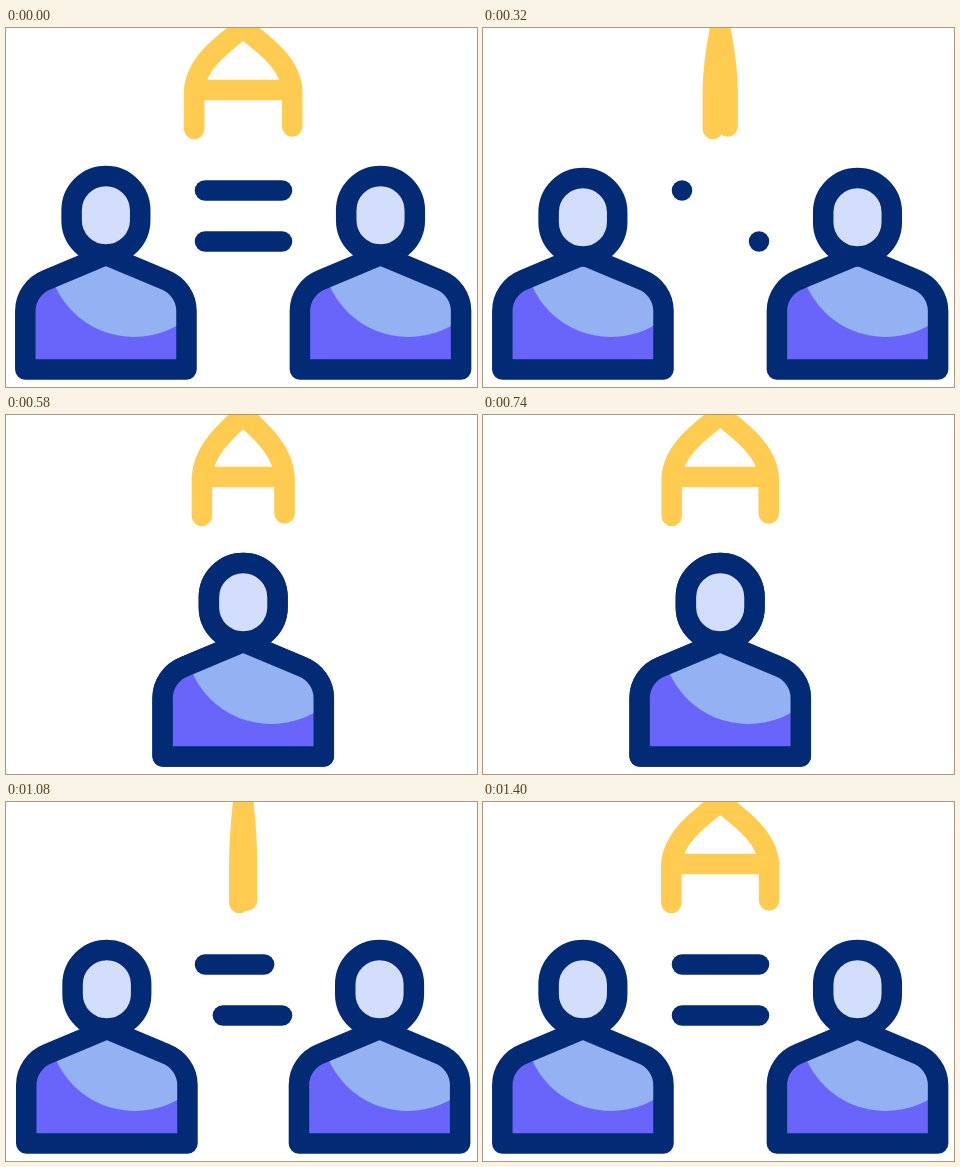
An HTML page with a canvas that plays this animation: 471x359 px, repeating every 1.44 s.

```html
<!DOCTYPE html>
<html lang="en">
<head>
<meta charset="utf-8">
<title>Two people, one letter</title>
<style>
  html, body { margin: 0; height: 100%; overflow: hidden; background: #fff; }
  canvas { display: block; }
</style>
</head>
<body>
<canvas width="471" height="359"></canvas>
<script>
const ctx = document.querySelector('canvas').getContext('2d');
const LOOP = 1440, STEP = 20, SPIN = 1416;
const NAVY = '#032a75', GOLD = '#ffcb50', VIOLET = '#6a65fa', SKY = '#93b1f3', PALE = '#d3ddfc';
const CENTER = 237.2, SPREAD = 137.3;

const body = new Path2D('M0 227L-59 251.8C-72 257-80.6 269-80.6 283V341.5H80.6V283C80.6 269 72 257 59 251.8Z');
const head = new Path2D();
head.roundRect(-34.3, 148, 68.6, 78.5, 34.3);

// Eased progress from start to end, clamped to 0..1
function ease(t, start, end) {
  const u = Math.min(1, Math.max(0, (t - start) / (end - start))) ** 0.88;
  return u * u * (3 - 2 * u);
}

function paint(path, fill, stroke) {
  ctx.fillStyle = fill;
  ctx.fill(path);
  if (!stroke) return;
  ctx.strokeStyle = stroke;
  ctx.stroke(path);
}

function person(x, nod) {
  ctx.save();
  ctx.translate(x, 0);
  paint(body, VIOLET);
  ctx.save();
  ctx.clip(body);
  const shine = new Path2D();
  shine.arc(28, 222.5, 86.5, 0, 7);
  paint(shine, SKY);
  ctx.restore();
  ctx.strokeStyle = NAVY;
  ctx.stroke(body);
  ctx.translate(0, nod);
  paint(head, PALE, NAVY);
  ctx.restore();
}

function bar(x1, x2, y) {
  ctx.strokeStyle = NAVY;
  ctx.beginPath();
  ctx.moveTo(x1, y);
  ctx.lineTo(x2 + 0.01, y);
  ctx.stroke();
}

// Letter A turning about its upright axis; the stroke keeps its weight
function letter(turn) {
  const x = d => CENTER + d * turn;
  ctx.strokeStyle = GOLD;
  ctx.beginPath();
  ctx.moveTo(x(-49), 101);
  ctx.lineTo(x(-49), 62);
  ctx.bezierCurveTo(x(-47), 36, x(-23), 18, x(0), 0);
  ctx.bezierCurveTo(x(23), 18, x(47), 36, x(49), 62);
  ctx.lineTo(x(49), 98.5);
  ctx.moveTo(x(-49), 62);
  ctx.lineTo(x(49), 62);
  ctx.stroke();
}

function draw(t) {
  if (t < 80) t = 0;
  ctx.clearRect(0, 0, 471, 359);
  ctx.lineCap = ctx.lineJoin = 'round';
  ctx.lineWidth = 20.5;

  letter(Math.abs(Math.cos(2 * Math.PI * Math.min(t / SPIN, 1))));

  if (t < 340 || t > 920) {
    const length = 77 * (t < 340 ? 1 - ease(t, 0, 320) : ease(t, 920, 1165));
    bar(199, 199 + length, 162.5);
    bar(276 - length, 276, 213.5);
  }

  const apart = SPREAD * (1 - ease(t, 320, 550) + ease(t, 740, 1100));
  const nod = t < 360 ? 6 * Math.sin(Math.PI * t / 360) : 0;
  person(CENTER + apart, nod);
  person(CENTER - apart, nod);
}

function tick() {
  draw(Math.floor(performance.now() % LOOP / STEP) * STEP);
  requestAnimationFrame(tick);
}
tick();
</script>
</body>
</html>
```
